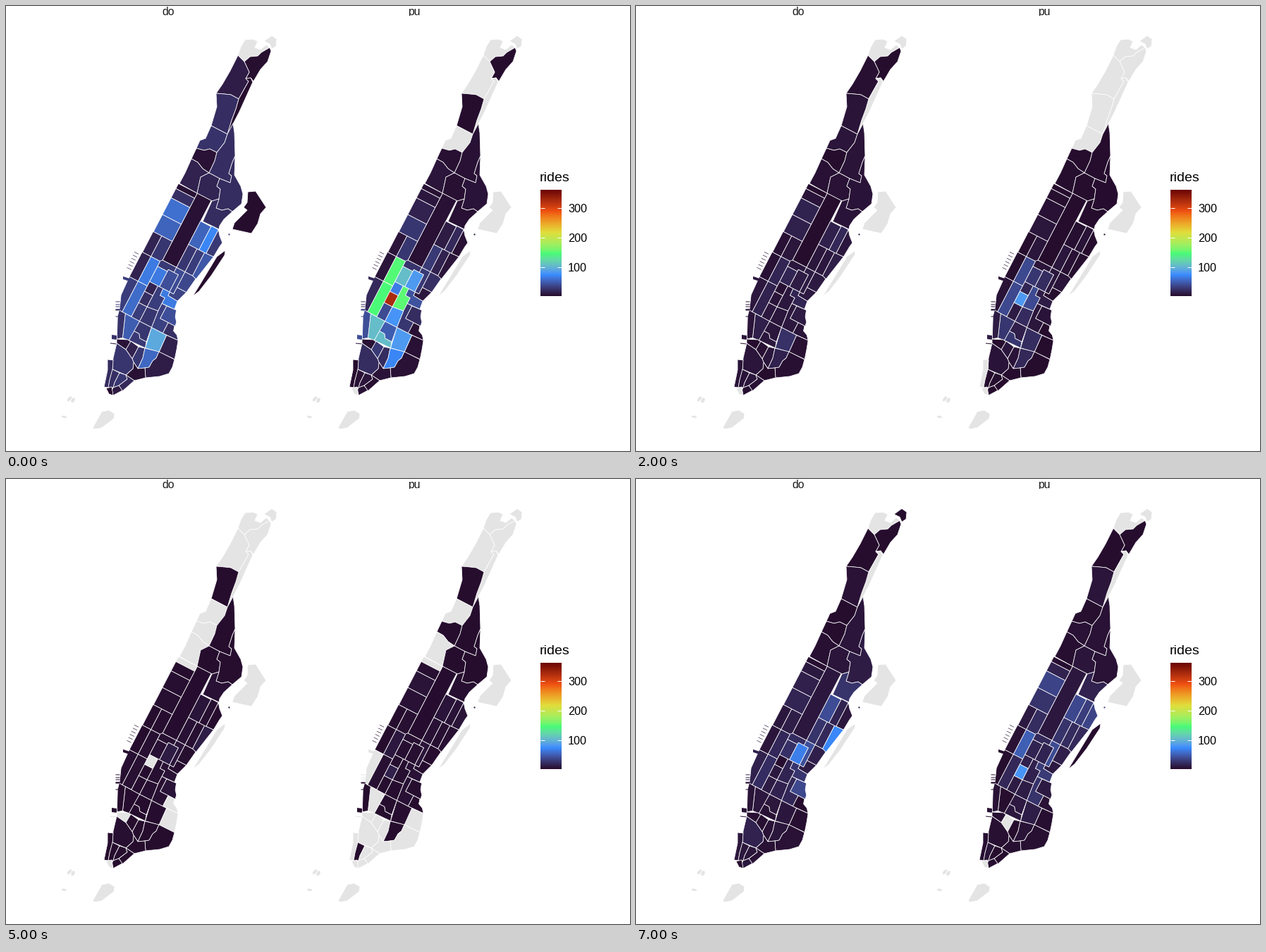
Recreate the animation shown at these times as a matplotlib script. Size 885 px wide and 632 px high, loop 8000 ms.

```python
import numpy as np
import matplotlib.pyplot as plt
from matplotlib.animation import FuncAnimation
from matplotlib.collections import PolyCollection
from matplotlib.colors import to_rgb
from matplotlib.patches import Rectangle

W, H, DPI = 885, 632, 100
SHIFT = 348            # from the left map to the right one
TOP = 361              # rides at the upper end of the scale
GREY = "#e4e4e4"
STOPS = ["#260d2e", "#388cff", "#45fb78", "#e0dd3c", "#ef5012", "#6b0404"]

# Night traffic dies away while morning traffic builds up, hour by hour.
NIGHT = np.array([1, .42, .25, .13, .06, .004, .01, .01])
MORNING = np.array([0, 0, 0, 0, .05, .15, .6, 1])
IDLE = .5              # expected rides below this leave a zone grey

# ---- colour scale, blended in Lab ----
M = np.array([[.4124, .3576, .1805], [.2126, .7152, .0722], [.0193, .1192, .9505]])
WHITE = M.sum(axis=1)


def to_lab(rgb):
    lin = np.where(rgb > .04045, ((rgb + .055) / 1.055) ** 2.4, rgb / 12.92)
    f = lin @ M.T / WHITE
    f = np.where(f > .008856, np.cbrt(f), 7.787 * f + 16 / 116)
    x, y, z = f.T
    return np.stack([116 * y - 16, 500 * (x - y), 200 * (y - z)], axis=1)


def from_lab(lab):
    y = (lab[:, 0] + 16) / 116
    f = np.stack([y + lab[:, 1] / 500, y, y - lab[:, 2] / 200], axis=1)
    xyz = np.where(f > .2069, f ** 3, (f - 16 / 116) / 7.787) * WHITE
    lin = np.clip(xyz @ np.linalg.inv(M).T, 0, 1)
    return np.clip(np.where(lin > .0031308, 1.055 * lin ** (1 / 2.4) - .055, 12.92 * lin), 0, 1)


STOP_LAB = to_lab(np.array([to_rgb(c) for c in STOPS]))


def shade(rides):
    t = (np.asarray(rides, float) - 1) / (TOP - 1)
    grid = np.linspace(0, 1, len(STOPS))
    return from_lab(np.stack([np.interp(t, grid, lab) for lab in STOP_LAB.T], axis=1))


# ---- zones: (night, morning) level of drop-offs and pick-ups, outline ----
shapes, edges, drops, picks = [], [], [], []


def zone(do, pu, pts):
    shapes.append(np.array(pts, float))
    edges.append("white")
    drops.append(do[0] * NIGHT + do[1] * MORNING)
    picks.append(pu[0] * NIGHT + pu[1] * MORNING)


def pier(x, y, w, h, tilt=0):
    """A jetty that takes the colour of the zone before it."""
    shapes.append(np.array([(x, y), (x + w, y + tilt), (x + w, y + tilt + h), (x, y + h)]))
    edges.append("none")
    drops.append(drops[-1])
    picks.append(picks[-1])


def streets(*pts):
    """Street-grid offsets (uptown, crosstown) from the park's lower left corner."""
    return [(222 + .46 * n + .888 * e, 361 - .888 * n + .46 * e) for n, e in pts]


def block(n0, n1, e0, e1):
    return streets((n1, e0), (n1, e1), (n0, e1), (n0, e0))


def island(do, pu, x, y, rx, ry, lean=0):
    a = np.linspace(0, 2 * np.pi, 14)
    zone(do, pu, np.stack([x + rx * np.cos(a) - lean * np.sin(a), y + ry * np.sin(a)], axis=1))


OFF = (0, 0)

# islands
island(OFF, OFF, 90, 558, 3, 4, 2)
island(OFF, OFF, 95, 560, 3, 4, 1)
island(OFF, OFF, 82.5, 583.5, 4, 2, -1)
zone(OFF, OFF, [(123, 599), (136, 576), (146, 574), (154, 579), (153, 586), (136, 599), (126, 601)])
zone((1, 0), OFF, [(343, 264), (354, 263), (369, 286), (361, 295), (357, 309), (348, 323),
                   (321, 317), (324, 308), (335, 297), (342, 290), (337, 286), (342, 279)])
zone((1, 0), (0, 1), [(311, 347), (310, 354), (291, 383), (274, 405), (265, 412), (276, 394), (299, 356)])

# northern tip; neighbours share the named borders
ridge = [(338, 79), (346, 72), (357, 71), (362, 66), (374, 59)]
vale = [(340, 103), (344, 107), (330, 132)]
cross = [(330, 132), (319, 126), (310, 125), (298, 124)]
cliff = [(330, 132), (326, 146), (320, 162), (314, 182)]
zone((0, .7), OFF, [(366, 50), (377, 42), (384, 47), (383, 57), (377, 61), (374, 54)])
zone(OFF, OFF, [(329, 70), (333, 58), (339, 48), (350, 47), (357, 50), (353, 59), (361, 62),
                (369, 55)] + ridge[::-1])
zone((2, 1), (1, .5), ridge + [(376, 64), (371, 79), (361, 90), (351, 107), (347, 102), (340, 103), (345, 94)])
zone((11, .5), (0, .7), [(329, 70), (338, 79), (345, 94)] + vale + cross[1:] + [(307, 111), (318, 92)])
zone((1, 0), OFF, [(347, 102), (350, 108), (331, 150), (315, 181)] + cliff[::-1] + vale[1::-1])
zone((21, 4), (1, 6), cliff + [(291, 170), (299, 143)] + cross[:0:-1])

# upper end
hill = [(270, 202), (281, 205), (289, 203), (299, 208)]
bluff = [(263, 217), (272, 222), (279, 231), (288, 237)]
slope = [(314, 182), (310, 194), (299, 208)]
mid = [(325, 213), (321, 222), (316, 238), (320, 241), (318, 251), (303, 245)]
fifth = [(303, 245), (299, 256), (304, 260), (302, 274)]
lower = [(302, 274), (298, 287), (306, 290), (315, 288), (321, 292)]
zone((24, .8), (0, 2), [(291, 170)] + slope + hill[-2::-1] + [(275, 191), (283, 188)])
zone((4, .7), (3, 4), hill + [(296, 220)] + bluff[::-1])
zone((14, 2.8), (6, 2), bluff + [(276, 243), (271, 266), (246, 252), (254, 237)])
zone((21, 6), (3.5, 4), [(322, 167), (324, 180)] + mid + [(288, 237), (296, 220)] + slope[::-1])
zone((16, 6), (3, 6), [(276, 243), (288, 237)] + fifth + [(292, 277), (271, 266)])
zone((20, 10), (5, 4), [(325, 213), (324, 240), (333, 256), (336, 267), (334, 281)]
     + lower[::-1] + fifth[-2::-1] + mid[-2:0:-1])
zone((20, 24), (3.5, 14), [(292, 277)] + lower + [(309, 303), (303, 312), (302, 317), (279, 306)])

# park and west side, uptown to downtown
zone((3.5, 8), (3.5, 8), block(0, 107, 0, 22.4))
rows = [107, 99, 84.2, 57.5, 30]
west = [((3.5, 2.5), (3.5, 2.5)), ((22, 8), (8, 14)), ((58, 12), (14, 34)), ((52, 15), (26, 24))]
for (do, pu), n1, n0 in zip(west, rows, rows[1:]):
    zone(do, pu, block(n0, n1, -30, 0))
zone((26, 11), (26, 20), block(-3, 30, -17, 0))
zone((15, 7), (6, 9), block(-3, 30, -30.5, -17))
zone((14, 6), (6, 4), block(-42.5, -3, -31, -17))
for k in range(6):
    pier(188 - 2.1 * k, 352 + 4.4 * k, -6, .7, -3)
zone((64, 17), (148, 48), block(-42.5, -3, -17, -2.3))
zone((30, 13), (18, 1.2), streets((-42.5, -31), (-42.5, -17), (-91.5, -17), (-91.5, -21.5), (-71, -29.5)))
pier(166, 384, 9, 4, 3)
for k in range(5):
    pier(155, 415.5 + 3.6 * k, 6, .8)
zone((56, 20), (146, 16), block(-91.5, -42.5, -17, -2.3))

# midtown
zone((28, 20), (25, 18), streets((0, 0), (0, 22.4), (-8, 22.4), (-8, 13.5), (-11, 13.5), (-11, -2.3), (-2, -2.3)))
zone((64, 22), (105, 14), block(-35.5, -11, -2.3, 13.5))
zone((15, 1.5), (65, 13), block(-51, -35.5, -2.3, 11))
zone((22, 8), (325, 75), block(-69, -51, -2.3, 11))
zone((40, 66), (82, 14), block(-35.5, -8, 13.5, 29.5))
zone((38, 40), (28, 38), streets((0, 22.4), (0, 36), (-35.5, 36), (-35.5, 29.5), (-8, 29.5), (-8, 22.4)))
zone((36, 12), (22, 12), streets((0, 36), (0, 50), (-2, 54), (-25, 51), (-25, 36)))
zone((34, 10), (8, 8), streets((-25, 36), (-25, 51), (-42, 45.5), (-41, 30), (-35.5, 30), (-35.5, 36)))
zone((30, 15), (150, 12), streets((-35.5, 11), (-35.5, 19.5), (-46, 20), (-46, 27.5), (-67, 27.5), (-69, 11)))
zone((64, 25), (42, 28), streets((-35.5, 19.5), (-35.5, 30), (-41, 30), (-42, 45.5), (-54, 47),
                                 (-55, 27.5), (-46, 27.5), (-46, 20)))

# east side
zone((52, 38), (10, 36), block(36.8, 74, 22.4, 39.2))
zone((70, 14), (18, 30), block(36.8, 75, 39.2, 50.5))
zone((28, 7), (3.5, 34), streets((75, 50.5), (68, 56), (61, 64), (54, 63), (37.5, 62), (37, 50.5)))
pier(314.5, 323, 2, 2)
zone((26, 24), (28, 24), block(0, 36.8, 22.4, 36))
zone((30, 18), (14, 20), block(0, 36.8, 36, 48))
zone((45, 70), (6, 18), streets((36.8, 48), (37.5, 62), (-2, 54.5), (0, 48)))

# below the middle
zone((40, 36), (20, 9), streets((-55, 35), (-54, 50), (-63, 53), (-69, 58), (-75, 59), (-75, 35)))
zone((32, 17), (26, 24), streets((-55, 27.5), (-55, 35), (-75, 35), (-75, 48), (-92, 48), (-92, 30), (-67, 27.5)))
zone((30, 10), (38, 9), block(-92, -69, -2.3, 11))
zone((26, 14), (78, 10), streets((-69, 11), (-67, 27.5), (-92, 30), (-92, 11)))
zone((22, 1), (3.5, 4), streets((-75, 48), (-75, 58), (-82, 60), (-85, 67), (-91, 72), (-92, 48)))
zone((13, 2), (3.5, 2), streets((-92, 54), (-91, 72), (-103, 76), (-117, 80), (-118, 55.5)))
zone((92, 6), (82, 10), streets((-92, 30), (-92, 54), (-118, 55.5), (-122, 35.5)))
village = [(-108, 10), (-108, 18.5), (-113.5, 22.5), (-113.5, 33)]
zone((26, 7), (48, 8), streets((-92, 11), (-92, 30), *village[::-1]))
zone((28, 4), (105, 7), streets(*village, (-122, 35.5), (-123, 10)))
zone((48, 7), (105, .5), streets((-91.5, -12), (-92, 11), (-123, 10), (-124, .5)))
zone((24, 5), (40, 4), streets((-91.5, -17), (-91.5, -12), (-124, .5), (-129, -6), (-100, -20), (-91, -22)))
pier(155, 430, 6, 2)
pier(155, 440, 4, 1)
pier(150, 467, 7, 6, 1)

# lower end
canal = [(157, 479), (170, 488), (179, 501), (181, 506), (180, 515), (170, 524)]
bowery = [(197, 486), (194, 500), (187, 515)]
delancey = [(217, 491), (213, 500), (208, 504), (203, 513), (197, 514)]
broad = [(161, 521), (170, 524), (172, 530), (160, 539)]
zone((5, 3), (3.5, 2.5), [(157, 473), (173, 474), (177, 477)] + canal[1::-1])
pier(148, 478.5, 9, 1, 1)
zone((14, 3), (28, 0), [(177, 476), (188, 484), (179, 501), (170, 488)])
zone((26, 4), (20, 1), [(188, 484)] + bowery + [(181, 506), (179, 501)])
zone((54, 6), (70, 4), delancey + bowery[::-1])
zone((11, 4), (4, 3), delancey + [(198, 528), (218, 526), (231, 522), (236, 513), (239, 502)])
zone((3.5, 3.5), (5, 2), [(181, 506), (187, 515), (197, 514), (198, 528), (182, 532), (170, 524), (180, 515)])
zone((25, 14), (20, 2.5), canal + [(151, 516), (152, 500)])
zone((20, 7), (1, 2.5), [(144, 502), (152, 503), (151, 517), (147, 531), (145, 542), (139, 541), (144, 517)])
zone((22, 7), (3.5, 5), [(151, 516), (161, 521), (154, 535), (152, 542), (145, 542), (147, 531)])
zone((26, 6), (6, .7), broad + [(152, 542), (154, 535)])
zone((18, 4), (3, .7), broad[1:] + [(165, 547), (182, 532)])
zone((10, 7), (4, 2), [(152, 542), (160, 539), (165, 546), (152, 553), (150, 546)])
zone((1, .7), OFF, [(142, 543), (150, 541), (151, 547), (152, 553), (146, 551)])

# ---- stage ----
fig = plt.figure(figsize=(W / DPI, H / DPI), dpi=DPI, facecolor="white")
ax = fig.add_axes([0, 0, 1, 1])
ax.set_axis_off()


def panel(dx):
    coll = PolyCollection([p + (dx, 0) for p in shapes], edgecolors=edges, linewidths=.55)
    ax.add_collection(coll)
    return coll


def label(x, y, text, px, color="black", ha="left"):
    ax.text(x, y, text, fontsize=px * 72 / DPI, color=color, ha=ha, va="baseline",
            family="Liberation Sans")


maps = [(panel(0), np.array(drops)), (panel(SHIFT), np.array(picks))]

for x, text in ((230.5, "do"), (578.5, "pu")):
    label(x, 13, text, 15.8, "#1a1a1a", "center")
ax.add_patch(Rectangle((0, 14), W, 6, fc="white", ec="none", zorder=5))

label(757, 249, "rides", 19.5)
bar = shade(np.linspace(TOP, 1, 300))[:, None, :]
ax.imshow(bar, extent=(758, 788, 412, 261), aspect="auto", interpolation="bilinear")
for n in (100, 200, 300):
    y = 413 - .42 * n
    label(797, y + 5.8, str(n), 16.2)
    for x in (758, 782):
        ax.plot([x, x + 6], [y, y], color="white", lw=.7, solid_capstyle="butt")
ax.set_xlim(0, W)
ax.set_ylim(H, 0)


def draw(hour):
    for coll, rides in maps:
        now = rides[:, hour]
        busy = now[:, None] >= IDLE
        coll.set_facecolor(np.where(busy, shade(np.maximum(now, 1)), to_rgb(GREY)))
    return [coll for coll, _ in maps]


anim = FuncAnimation(fig, draw, frames=8, interval=1000, repeat=True, repeat_delay=0, blit=False)
plt.show()
```
